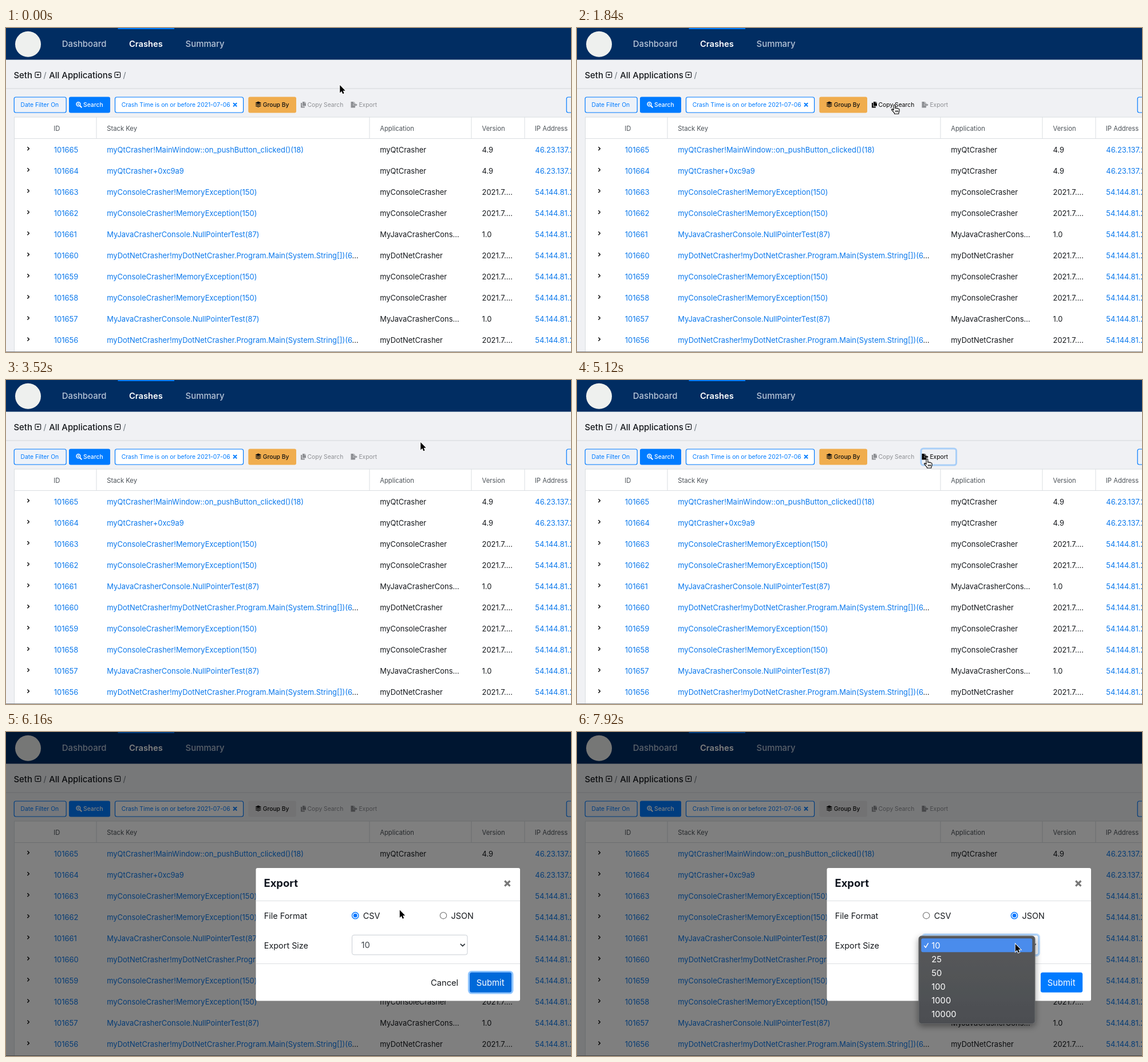
An HTML page for the animation above (8 s loop, 987 px wide and 567 px high).

```html
<!DOCTYPE html>
<html lang="en">
<head>
<meta charset="utf-8">
<title>Crash list export</title>
<style>
  html, body { margin: 0; width: 100%; height: 100%; overflow: hidden; background: #f0f1f4; }
  svg { display: block; width: 987px; height: 567px; font-family: Inter, sans-serif; }
  text { white-space: pre; }
  .line { fill: none; stroke-linecap: round; stroke-linejoin: round; }
  .tool { color: #8d8f93; }
  .tool.on { color: #000; }
</style>
</head>
<body>
<svg id="stage" viewBox="0 0 987 567">
  <defs>
    <linearGradient id="menuFill" x2="0" y2="1">
      <stop offset="0" stop-color="#57595c"/><stop offset="1" stop-color="#4c4e51"/>
    </linearGradient>
    <filter id="shadow" x="-20%" y="-20%" width="140%" height="150%">
      <feDropShadow dx="0" dy="4" stdDeviation="6" flood-opacity=".42"/>
    </filter>
  </defs>
  <g id="page"></g>
  <g id="modal">
    <rect width="987" height="567" opacity=".5"/>
    <rect x="436.5" y="238" width="461.5" height="232.5" rx="3" fill="#fff"/>
    <path d="M437 295.5H898M437 405.5H898" stroke="#dcdfe3"/>
    <path d="M871.2 260.5l9.2 9.2m0-9.2l-9.2 9.2" stroke="#777" stroke-width="3.2"/>
  </g>
  <g id="menu"></g>
  <g id="cursor">
    <path id="arrow" d="M0 0V13.4L3 10.6 5 15.3 7.3 14.3 5.3 9.8H9.4Z" fill="#000" stroke="#fff" stroke-width="1.8" paint-order="stroke"/>
    <path id="hand" transform="translate(1 1)" fill="#fff" stroke="#000" stroke-width="1.1" stroke-linejoin="round"
      d="M-1.4 9.5V1.3Q-1.4 0 0 0T1.4 1.3V6.2Q2.6 5 4 6.4 5.4 5.6 6.4 7 8.6 6.6 8.6 9V11.5Q8.4 13 7.4 14.2V16H0V14.6Q-2 12.5-4.6 9.4-5.4 8-4 7.6-2.8 7.6-1.4 9.5ZM2.2 10V13M4.2 10V13M6.2 10V13"/>
  </g>
</svg>
<script>
const LOOP = 8000, STEP = 80;
const $ = id => document.getElementById(id);
const page = $('page'), modal = $('modal'), menu = $('menu');

function add(parent, tag, attrs, content) {
  const el = document.createElementNS('http://www.w3.org/2000/svg', tag);
  for (const k in attrs) el.setAttribute(k, attrs[k]);
  if (content !== undefined) el.textContent = content;
  parent.append(el);
  return el;
}

// cy is the middle of the capital letters
const text = (parent, x, cy, size, fill, content, weight = 400) =>
  add(parent, 'text', { x, y: cy + size * .364, 'font-size': size, fill, 'font-weight': weight }, content);
const box = (parent, x, y, x2, y2, fill, extra = {}) =>
  add(parent, 'rect', { x, y, width: x2 - x, height: y2 - y, fill, ...extra });
const path = (parent, d, extra) => add(parent, 'path', { d, ...extra });
const line = (parent, d, stroke, width = 1) =>
  path(parent, d, { class: 'line', stroke, 'stroke-width': width });

const BLUE = '#007bff', LINK = '#0a78ec', INK = '#15181c';

// top bar
box(page, 0, 0, 987, 567, '#f0f1f4');
box(page, 0, 0, 987, 55.5, '#012d62');
box(page, 195.5, 0, 294, 2, BLUE);
add(page, 'circle', { cx: 38.5, cy: 28.3, r: 22.5, fill: '#eef0ee' });
text(page, 97.7, 28, 14.9, '#b5c3d6', 'Dashboard', 500);
text(page, 215, 28, 14.7, '#fff', 'Crashes', 600);
text(page, 313.6, 28, 14.9, '#b5c3d6', 'Summary', 500);

// breadcrumb
text(page, 13.5, 82.7, 14.9, INK, 'Seth', 500);
text(page, 75.3, 82.7, 14.9, INK, 'All Applications', 500);
for (const x of [51, 190]) {
  box(page, x, 77.3, x + 9.6, 86.7, 'none', { rx: 1.5, stroke: INK, 'stroke-width': 1.2 });
  path(page, `M${x + 2.2} 80.7h5.2l-2.6 3z`, { fill: INK });
}
text(page, 65.5, 82.7, 14, '#6c757d', '/');
text(page, 204.5, 82.7, 14, '#6c757d', '/');
box(page, 0, 105.5, 987, 106.5, '#d6d8dc');

// toolbar
const outline = { rx: 3, stroke: BLUE, 'stroke-width': 1.2 };
const label = (x, fill, s, weight) => text(page, x, 134.3, 10.3, fill, s, weight);
box(page, 14.2, 121, 105.2, 148, '#edf2f9', outline);
label(25.5, BLUE, 'Date Filter On');
box(page, 110, 120.5, 182, 148.5, BLUE, { rx: 3 });
add(page, 'circle', { cx: 126.4, cy: 133.2, r: 3.4, fill: 'none', stroke: '#fff', 'stroke-width': 1.5 });
line(page, 'M129.2 136l2.6 2.7', '#fff', 2);
line(page, 'M124.8 133.2h3.2m-1.6-1.6v3.2', '#fff', 1);
label(135, '#fff', 'Search', 500);
box(page, 190.5, 121, 414.6, 148, '#fff', outline);
label(201.7, BLUE, 'Crash Time is on or before 2021-07-06');
line(page, 'M397.6 131.8l5 5m0-5l-5 5', BLUE, 2);
const groupBox = box(page, 423.3, 120.5, 507, 148.5, '#f0ad4e', { rx: 3 });
path(page, 'M440.7 128.6l5.4 2.5-5.4 2.5-5.4-2.5zM435.3 133.4l1.6-.7 3.8 1.8 3.8-1.8 1.6.7-5.4 2.6zM435.3 136.2l1.6-.7 3.8 1.8 3.8-1.8 1.6.7-5.4 2.6z', { fill: '#111' });
label(448.7, '#111', 'Group By', 500);
box(page, 979.2, 121, 1010, 148, '#edf2f9', outline);

const ring = box(page, 601, 120, 662.6, 149, '#eff1f5', { rx: 4, 'stroke-width': 3 });
const copyTool = add(page, 'g', { class: 'tool' });
path(copyTool, 'M518 129h3.6v2.4h2.4v5.2h-6zM522.2 129l1.8 1.8h-1.8zM515 131h2.2v6.5h4.6v1.9h-6.8z', { fill: 'currentColor' });
text(copyTool, 526.6, 134.3, 10.3, 'currentColor', 'Copy Search');
const exportTool = add(page, 'g', { class: 'tool' });
path(exportTool, 'M602.5 129h4.6v2.8h2.8v1.6h-3.6v2.2h3.6v3.8h-7.4zM607.8 129l2.1 2.1h-2.1zM610.6 132.1l3.2 2.4-3.2 2.4v-1.6h-3.4v-1.6h3.4z', { fill: 'currentColor' });
text(exportTool, 616.4, 134.3, 10.3, 'currentColor', 'Export');

// table
box(page, 14.5, 156, 1000, 580, '#fff', { stroke: '#dadde1' });
box(page, 14, 193, 987, 194, '#dadde1');
const columns = [[83.3, 'ID'], [176.2, 'Stack Key'], [653.2, 'Application'], [831.5, 'Version'], [923.8, 'IP Address']];
columns.forEach(([x, s]) => text(page, x, 175.7, 11.25, '#4b5157', s));
for (const x of [158, 635, 813, 906]) box(page, x - .5, 156, x + .5, 193, '#dadde1');

// [stack key, cut off?, application, version]
const memory = ['myConsoleCrasher!MemoryException(150)', 0, 'myConsoleCrasher', '2021.7.…'];
const java = ['MyJavaCrasherConsole.NullPointerTest(87)', 0, 'MyJavaCrasherCons…', '1.0'];
const dotNet = ['myDotNetCrasher!myDotNetCrasher.Program.Main(System.String[])(6', 1, 'myDotNetCrasher', '2021.7.…'];
const rows = [
  ['myQtCrasher!MainWindow::on_pushButton_clicked()(18)', 0, 'myQtCrasher', '4.9'],
  ['myQtCrasher+0xc9a9', 0, 'myQtCrasher', '4.9'],
  memory, memory, java, dotNet, memory, memory, java, dotNet
];
rows.forEach(([key, cut, app, version], i) => {
  const y = 213.1 + 37.06 * i;
  const cell = (x, fill, s) => text(page, x, y, 12.95, fill, s);
  line(page, `M37.8 ${y - 4.6}l2.6 2.6-2.6 2.6`, '#111', 1.5);
  cell(83.8, LINK, 101665 - i);
  const keyText = cell(176.2, LINK, key);
  if (cut) add(keyText, 'tspan', { fill: INK }, '…');
  cell(653.2, INK, app);
  cell(831.5, INK, version);
  cell(924.3, LINK, i < 2 ? '46.23.137.2' : '54.144.81.2');
});
box(page, 0, 566, 987, 567, '#85878a');

// export dialog
text(modal, 450.4, 264, 18.5, '#10151f', 'Export', 700);
text(modal, 450.8, 322, 14.4, INK, 'File Format');
text(modal, 450.8, 374, 14.4, INK, 'Export Size');
function radio(x, s) {
  const rim = add(modal, 'circle', { cx: x, cy: 321.2, r: 5.7, fill: '#fff' });
  const dot = add(modal, 'circle', { cx: x, cy: 321.2, r: 3.4, fill: '#0075ff' });
  text(modal, x + 13.5, 322, 14.4, INK, s);
  return on => {
    rim.setAttribute('stroke', on ? '#0075ff' : '#767676');
    rim.setAttribute('stroke-width', on ? 1.4 : 1.1);
    dot.setAttribute('opacity', on ? 1 : 0);
  };
}
const setCsv = radio(610.2, 'CSV'), setJson = radio(764, 'JSON');
const selectRing = box(modal, 603, 354, 807.5, 391.5, 'none', { rx: 5, stroke: '#bfdeff', 'stroke-width': 3 });
const select = box(modal, 604.5, 355.3, 806, 389.8, '#fff', { rx: 3.5 });
text(modal, 620.4, 372.7, 14.8, '#41474d', '10');
line(modal, 'M794.3 371.3l3.4 3.4 3.4-3.4', '#343a40', 1.9);
text(modal, 742, 438.7, 14.7, INK, 'Cancel');
const submitRing = box(modal, 808.4, 419.4, 884.9, 457.1, 'none', { rx: 5, stroke: '#8ec4ff', 'stroke-width': 3 });
const submit = box(modal, 810, 420.8, 883.2, 455.7, BLUE, { rx: 3.5 });
text(modal, 821.8, 438.7, 14.8, '#fff', 'Submit');

// size menu
box(menu, 597, 357, 800, 510.5, 'url(#menuFill)', { rx: 5, stroke: '#66686b', filter: 'url(#shadow)' });
box(menu, 601.3, 361.3, 795.3, 385.3, '#4a8cec', { rx: 3 });
line(menu, 'M606.8 374.2l2.3 3 4.3-7.4', '#fff', 1.5);
[10, 25, 50, 100, 1000, 10000].forEach((n, i) => text(menu, 619.2, 373.2 + 24 * i, 14.8, '#fff', n));

// time, x, y of the pointer
const track = [
  [0, 583.3, 100], [800, 553.5, 133.3], [1840, 553.5, 133.3], [2160, 628, 136],
  [2720, 628, 136], [3280, 724.3, 109], [3680, 724.3, 109], [4320, 617, 138],
  [4480, 617, 138], [4880, 610.5, 137], [5920, 610.5, 137], [6160, 687.8, 311.5],
  [6240, 687.8, 311.5], [6640, 761, 317], [7280, 761, 317], [7600, 765.8, 371], [LOOP, 765.8, 371]
];
function pointer(t) {
  const i = track.findIndex(k => k[0] > t);
  const [t0, x0, y0] = track[i - 1], [t1, x1, y1] = track[i];
  const p = (t - t0) / (t1 - t0), e = p * p * (3 - 2 * p);
  return [x0 + (x1 - x0) * e, y0 + (y1 - y0) * e];
}
const ramp = (t, from, to) => Math.min(1, Math.max(0, (t - from) / (to - from)));
const show = (el, on) => el.setAttribute('visibility', on ? 'visible' : 'hidden');

function draw(t) {
  const [x, y] = pointer(t), open = t >= 5200;
  const over = (a, b) => !open && y > 119 && y < 149 && x > a && x < b;
  const onCopy = over(512, 592), onExport = over(600, 663);
  $('cursor').setAttribute('transform', `translate(${x} ${y})`);
  show($('hand'), onCopy || onExport);
  show($('arrow'), !(onCopy || onExport));
  copyTool.classList.toggle('on', onCopy);
  exportTool.classList.toggle('on', onExport || (open && t < 5280));

  ring.setAttribute('opacity', ramp(t, 4880, 5040) * (t < 5280 ? 1 : 0));
  ring.setAttribute('stroke', open ? '#f6f7f8' : '#a9cff8');
  groupBox.setAttribute('fill', open ? '#e6e6e7' : '#f0ad4e');

  show(modal, open);
  const focus = ramp(t, 5200, 5360) * (1 - ramp(t, 6880, 7040));
  submitRing.setAttribute('opacity', focus);
  submit.setAttribute('fill', `rgb(0 ${123 - 18 * focus} ${255 - 38 * focus})`);
  setCsv(t < 7040);
  setJson(t >= 7040);
  selectRing.setAttribute('opacity', ramp(t, 7680, 7840));
  select.setAttribute('stroke', t >= 7760 ? '#80bdff' : '#c9ced4');
  show(menu, t >= 7840);
}

const start = performance.now();
function tick() {
  const t = (performance.now() - start) % LOOP;
  draw(Math.floor(t / STEP) * STEP);
  requestAnimationFrame(tick);
}
tick();
</script>
</body>
</html>
```
